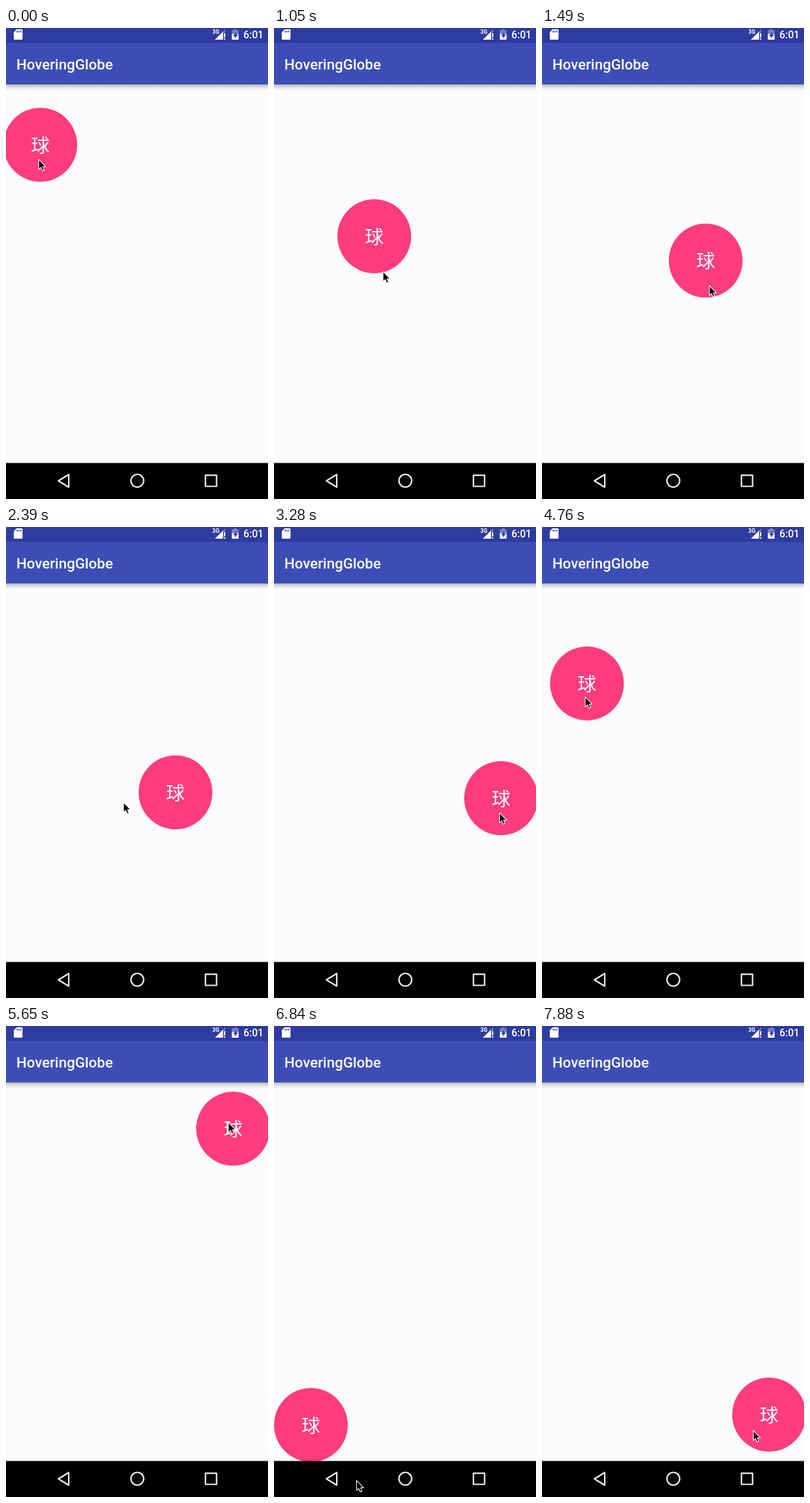
An HTML page that plays this animation: 405 px wide and 726 px high, repeating every 8000 ms.

```html
<!DOCTYPE html>
<html lang="en">
<head>
<meta charset="utf-8">
<title>Floating ball</title>
<style>
  html, body { margin: 0; width: 100%; height: 100%; overflow: hidden; background: #fbfbfb; }
  svg { display: block; width: 100%; height: 100%; }
  text { fill: #fff; font-family: Roboto, sans-serif; }
  .medium { font-weight: 500; }
  .glyph { font: 400 29px "Noto Sans CJK SC", "Noto Sans CJK", "Noto Sans CJK JP", sans-serif; }
</style>
</head>
<body>
<svg viewBox="0 0 405 726">
  <defs>
    <linearGradient id="shade" x2="0" y2="1">
      <stop offset="0" stop-opacity=".27"/>
      <stop offset=".45" stop-opacity=".12"/>
      <stop offset="1" stop-opacity="0"/>
    </linearGradient>
  </defs>
  <rect width="405" height="726" fill="#fbfbfb"/>
  <rect y="87" width="405" height="9" fill="url(#shade)"/>

  <g id="ball">
    <circle r="57" fill="#ff3c7e"/>
    <text class="glyph" y="11.5" text-anchor="middle">球</text>
  </g>

  <rect width="405" height="87" fill="#3c4eb6"/>
  <rect width="405" height="23" fill="#2e3b9f"/>
  <text class="medium" x="16" y="64" font-size="22.5">HoveringGlobe</text>

  <g fill="#fff">
    <path d="M16.5 2H24Q25.5 2 25.5 3.5V16.5Q25.5 18 24 18H13.5Q12 18 12 16.5V6.5Z"/>
    <path d="M17.3 4v3M20 4v3M22.7 4v3" stroke="#2e3b9f" stroke-width="1.4"/>
    <text x="319" y="9" font-size="8.5" font-weight="700">3G</text>
    <path d="M339 2V7H335.5V18H323Z" opacity=".3"/>
    <path d="M335.5 5.5V18H323Z"/>
    <path d="M337 8h2v6.5h-2ZM337 16h2v2h-2Z"/>
    <path d="M352.5 2h4v1.5h3V10h-10.5V3.5h3.5Z" opacity=".35"/>
    <path d="M349 9.5h10.5V18H349Z"/>
    <path d="M356 6L351 12.5H353.8V16.5L358.5 10H355.8Z" fill="#2e3b9f"/>
    <text class="medium" x="367" y="16" font-size="15.75">6:01</text>
  </g>

  <rect y="670.5" width="405" height="56"/>
  <g fill="none" stroke="#f2f2f2" stroke-width="2.2" stroke-linejoin="round">
    <path d="M81 698L97 688.2V707.800Z"/>
    <circle cx="203" cy="697.800" r="9.800"/>
    <rect x="308.300" y="689.300" width="17.200" height="17.200"/>
  </g>

  <path id="cursor" d="M.6 .6V15.800L4 12.800L6.400 18L9 16.900L6.800 11.700H11.500Z"
        stroke="#fff" stroke-width="1.1" stroke-linejoin="round"/>
</svg>
<script>
  const LOOP = 8000, LEFT = 53, RIGHT = 351;

  const linear = k => k;
  const smooth = k => k * k * (3 - 2 * k);

  // The pointer sits just below the glyph unless a move puts it elsewhere.
  const grip = ([x, y]) => [x - 3, y + 22];
  const move = (steps, ball, cursor = grip(ball), ease = linear) => ({ steps, ball, cursor, ease });

  const moves = [
    move(0, [LEFT, 180]),
    move(7, [155, 321], [168, 375]),
    move(6, [RIGHT, 396]),
    move(2, [RIGHT, 396]),
    move(1, [262, 409], [181, 424]),
    move(2, [198, 418]),
    move(3, [RIGHT, 418]),
    move(2, [RIGHT, 418]),
    move(4, [88, 245.4], [129, 216]),
    move(1, [LEFT, 246]),
    move(3, [LEFT, 246]),
    move(7, [RIGHT, 158.3], [343, 148], smooth),
    move(2, [RIGHT, 158.3], [343, 148]),
    move(6, [57, 615], [127, 700], smooth),
    move(2, [LEFT, 614]),
    move(3, [225, 580]),
    move(2, [RIGHT, 599], [326, 623])
  ];
  const lastStep = moves.reduce((sum, m) => sum + m.steps, 0);

  // Steps last 150 ms, with a 140 ms one at regular intervals.
  const stepStart = n => 150 * n - 10 * Math.max(0, Math.floor((n - 3) / 7));

  function stepAt(ms) {
    let n = lastStep;
    while (stepStart(n) > ms) n--;
    return n;
  }

  const mix = (a, b, k) => a.map((v, i) => v + (b[i] - v) * k);

  function poseAt(step) {
    let i = 1;
    while (step > moves[i].steps) step -= moves[i++].steps;
    const from = moves[i - 1], to = moves[i];
    const k = to.ease(step / to.steps);
    return { ball: mix(from.ball, to.ball, k), cursor: mix(from.cursor, to.cursor, k) };
  }

  const start = performance.now();
  function draw() {
    const pose = poseAt(stepAt((performance.now() - start) % LOOP));
    for (const id in pose)
      document.getElementById(id).setAttribute("transform", `translate(${pose[id]})`);
    requestAnimationFrame(draw);
  }
  draw();
</script>
</body>
</html>
```
